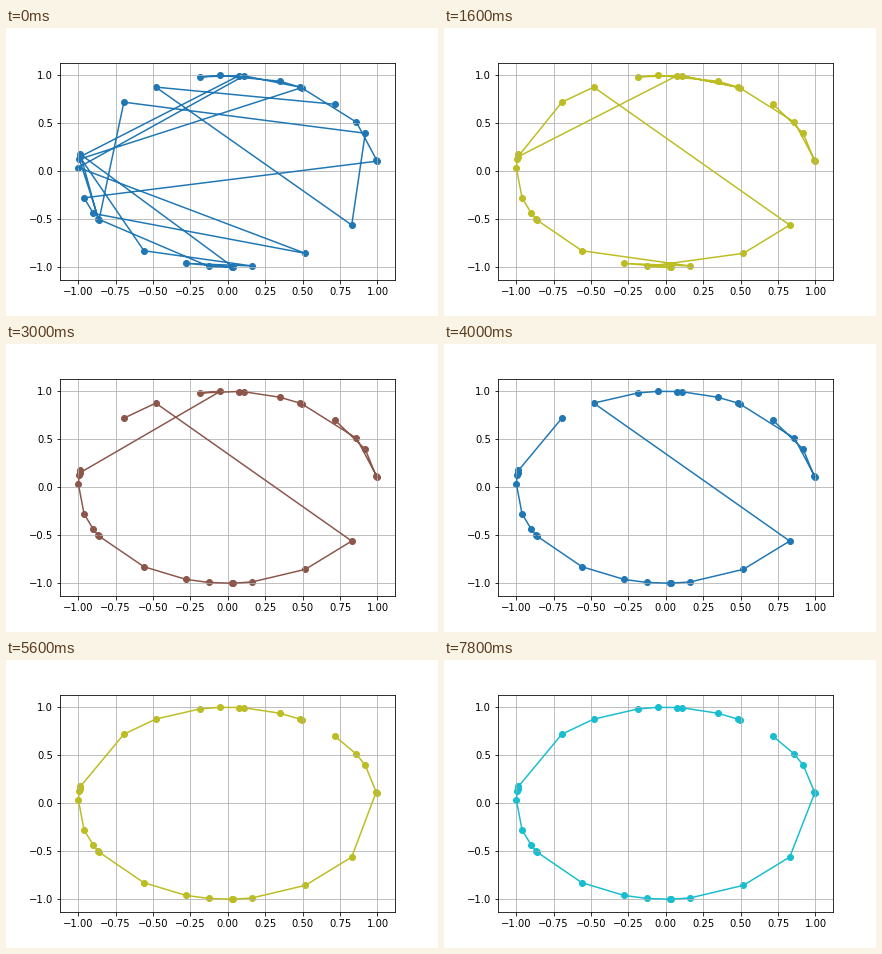
Animation of 432x288 px, one loop 8000 ms. Source, as a matplotlib script:

```python
import numpy as np
import matplotlib.pyplot as plt
from matplotlib.animation import FuncAnimation

FRAMES = 40
SETTLED = 37

# Cities on the unit circle (degrees), in the order of the first route
angles = np.array([
    44.2, 118.8, -34.1, 23.3, 134.0, -149.4, 172.8, 60.5, 30.7, 7.0,
    6.0, -163.9, -153.9, -58.8, 177.8, 83.8, 61.0, 69.6, 92.9, 100.7,
    85.6, 171.4, -124.1, -80.7, -106.2, -87.9, 169.9, -150.2, -97.2, -88.5])

# Number the cities clockwise from the first one, so the best route is 0, 1, 2...
clockwise = np.argsort((angles[0] - angles) % 360)
start = list(np.argsort(clockwise))
ring = np.radians(angles[clockwise])
x, y = np.cos(ring), np.sin(ring)


def length(route):
    return np.hypot(np.diff(x[route]), np.diff(y[route])).sum()


def joins(route):
    """Count the neighbours on the ring that are also neighbours on the route."""
    return np.sum(np.abs(np.diff(route + [len(route)])) == 1)


def turn(route, i, j):
    return route[:i] + route[i:j + 1][::-1] + route[j + 1:]


def improve(route):
    """Reverse one stretch: the shortest result that joins more neighbours."""
    n = len(route)
    options = [turn(route, i, j) for i in range(1, n) for j in range(i + 1, n)]
    better = [r for r in options if joins(r) > joins(route)]
    if better:
        return min(better, key=length)
    i = next(k for k in range(n) if route[k] != k)
    return turn(route, i, route.index(i))


routes = [start]
while routes[-1] != sorted(start):
    routes.append(improve(routes[-1]))

fig, ax = plt.subplots(figsize=(6, 4), dpi=72)
fig.subplots_adjust(left=0.125, right=0.9, bottom=0.125, top=0.88)
ax.set_xlim(-1.1215, 1.1159)
ax.set_ylim(-1.133, 1.132)
ax.set_xticks(np.arange(-1, 1.01, 0.25))
ax.set_yticks(np.arange(-1, 1.01, 0.5))
ax.grid()
dots = ax.scatter(x, y)
line, = ax.plot(x, y)


def update(frame):
    # Improvements come fast at first and grow rarer
    left = max(0, 1 - frame / SETTLED)
    route = routes[round((len(routes) - 1) * (1 - left ** 2))]
    color = f"C{frame % 10}"
    line.set_data(x[route], y[route])
    line.set_color(color)
    dots.set_color(color)
    return line, dots


anim = FuncAnimation(fig, update, frames=FRAMES, interval=200, repeat=True,
                     repeat_delay=0)
plt.show()
```
